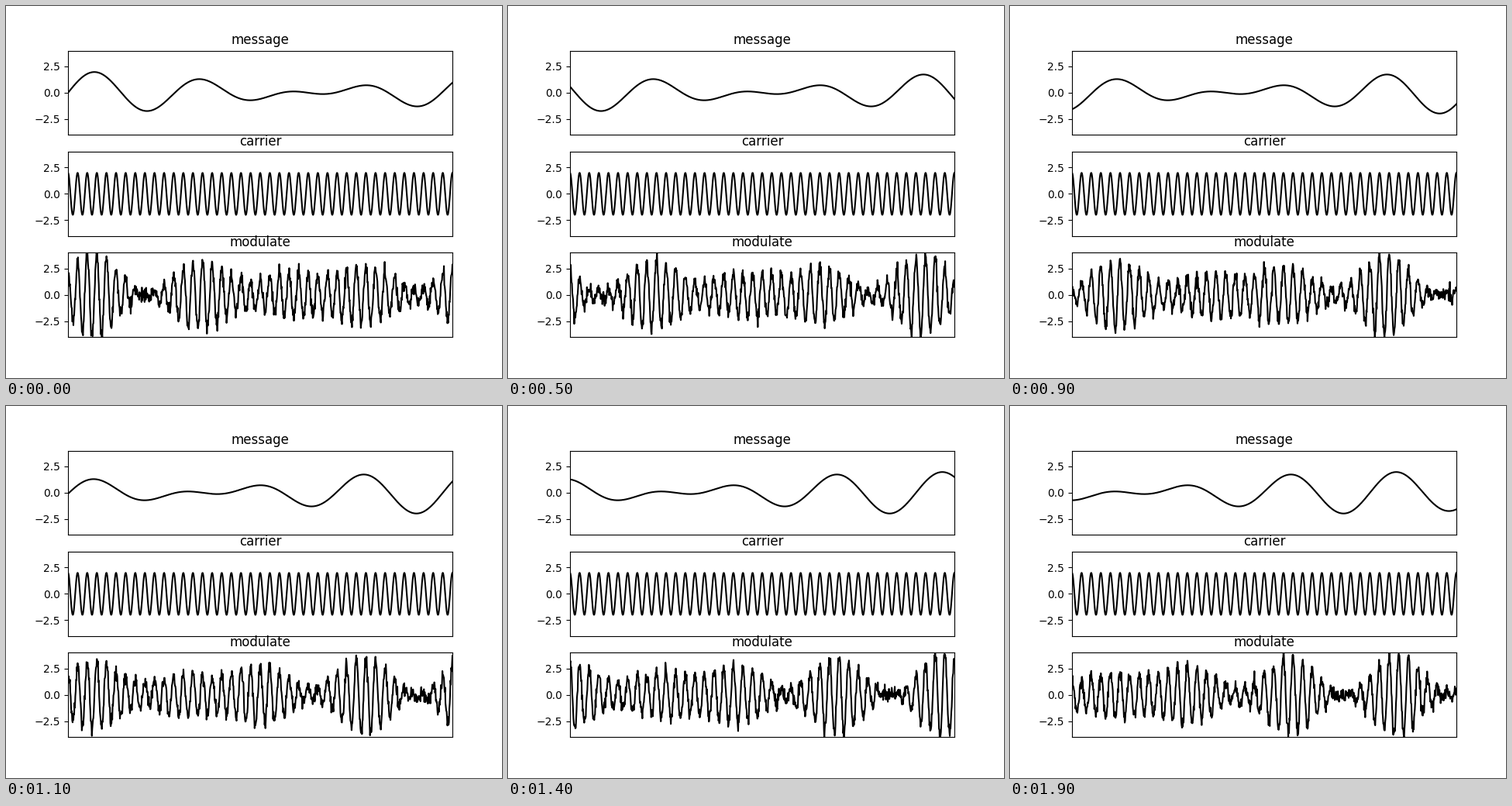
A matplotlib script for the animation above (2000 ms loop, 640x480 px).

```python
import numpy as np
import matplotlib.pyplot as plt
from matplotlib.animation import FuncAnimation

FRAMES = 20
INTERVAL = 100
STEP = 1 / 40      # window shift per frame
NOISE = 0.33

x = np.linspace(0, 1, 1000)


def message(t):
    return np.sin(2 * np.pi * 3.2 * t) + np.sin(2 * np.pi * 4 * t)


def carrier(t):
    return 2 * np.cos(2 * np.pi * 40 * t)


def signals(i):
    t = x + i * STEP
    m, c = message(t), carrier(t)
    noise = np.random.default_rng(100 + i).normal(0, NOISE, x.size)
    return m, c, (1 + 0.5 * m) * c + noise


fig, axes = plt.subplots(3, 1, figsize=(6.4, 4.8), dpi=100)
lines = []
for ax, name in zip(axes, ("message", "carrier", "modulate")):
    ax.set_title(name)
    ax.set_xlim(0, 1)
    ax.set_ylim(-4, 4)
    ax.set_xticks([])
    ax.set_yticks([-2.5, 0, 2.5])
    lines += ax.plot([], [], color="black", lw=1.5)


def update(i):
    for line, y in zip(lines, signals(i)):
        line.set_data(x, y)
    return lines


def init():
    return update(0)


anim = FuncAnimation(fig, update, frames=FRAMES, init_func=init,
                     interval=INTERVAL, repeat=True, repeat_delay=0)
plt.show()
```
